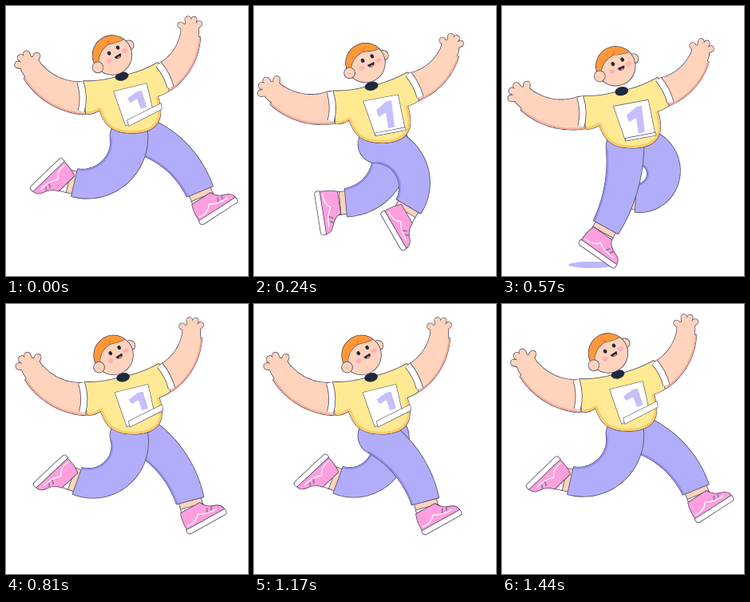
An HTML page with a canvas for the animation above (1470 ms loop, 303 by 338 pixels).

```html
<!DOCTYPE html>
<html lang="en">
<head>
<meta charset="utf-8">
<title>Runner</title>
<style>
  html, body { margin: 0; width: 100%; height: 100%; overflow: hidden; background: #fff; }
  canvas { display: block; width: 100%; height: 100%; }
</style>
</head>
<body>
<canvas id="stage" width="303" height="338"></canvas>
<script>
const ctx = document.getElementById('stage').getContext('2d');
const LOOP = 1470, STEP = 30, STRIDE = 720, HALF = STRIDE / 2;
const INK = '#4c4b64', SKIN = '#ffd3bc', SKIN_SHADE = '#f9aa98', WHITE = '#fff',
  SHIRT = '#ffe993', SHIRT_SHADE = '#ffcb68', PANTS = '#b1adfa', PANTS_SHADE = '#928df0',
  PINK = '#ff9fde', HAIR = '#ff9838', NAVY = '#20283c', LILAC = '#c6bffb', SHADOW = '#bcb6fb';

// One leg's stride; the other leg is half a stride away.
// Angles in degrees, clockwise from the right: thigh, shin, toes
const GAIT = [
  { t: 0, thigh: 86, shin: 193, toes: 136 },
  { t: 90, thigh: 78, shin: 200, toes: 137 },
  { t: 210, thigh: 0, shin: 184, toes: 100 },
  { t: 240, thigh: 5, shin: 121, toes: 60 },
  { t: 360, thigh: 20, shin: 68, toes: -33 },
  { t: 450, thigh: 32, shin: 75, toes: -29 },
  { t: 570, thigh: 88, shin: 119, toes: 35 },
  { t: 600, thigh: 78, shin: 175, toes: 81 }
];
const FINGERS = [[20, 1], [21, -8], [17, -15], [5, -19]];

const SHIRT_PATH = new Path2D('M97 94 Q118 95 138 89 L153 86 Q172 81 190 71 L204 106 Q199 110 190 113' +
  'C202 150 181 159 157 159 C130 159 122 145 117 130 Q109 136 100 135 Z');
const SHIRT_HEM = new Path2D('M190 113 C202 150 181 159 157 159 C130 159 122 145 117 130 Q109 136 100 135');
const CUFFS = [new Path2D('M93 95 Q99 115 94 132'), new Path2D('M191 73 Q202 86 206 102')];
const DIGIT = new Path2D('M-14 11 L-1 0 L5 -1 L9 32 L1 34 L-2 14 L-11 20 Z');
const SHOE = new Path2D('M-17 17 Q-18 3 -14 -7 L13 -7 Q17 2 27 5 Q37 8 36 17 Z');
const SOLE = new Path2D('M-18 15 L36 15 Q38 21 33 21 L-15 21 Q-19 21 -18 15 Z');
const TRIM = new Path2D('M-15 11 Q-2 13 4 4 Q12 10 28 10');
const HAIR_CAP = new Path2D('M-24.3 3 A24.5 24.5 0 0 1 22.8 -9 Q12 -10 4 -14 Q-8 -14 -15 -7 Q-20 -3 -20 3 Z');

const lerp = (a, b, k) => a + (b - a) * k;
const rad = degrees => degrees * Math.PI / 180;
function ramp(t, from, to) {
  const k = Math.min(1, Math.max(0, (t - from) / (to - from)));
  return k * k * (3 - 2 * k);
}

// Smooth periodic curve through the gait keys
function gait(t) {
  const n = GAIT.length;
  const at = j => ({ ...GAIT[(j + n) % n], t: GAIT[(j + n) % n].t + Math.floor(j / n) * STRIDE });
  const i = GAIT.findLastIndex(key => key.t <= t);
  const [a, b, c, d] = [i - 1, i, i + 1, i + 2].map(at);
  const span = c.t - b.t, u = (t - b.t) / span, v = 1 - u;
  const value = name => {
    const m0 = (c[name] - a[name]) / (c.t - a.t) * span;
    const m1 = (d[name] - b[name]) / (d.t - b.t) * span;
    return ramp(v, 0, 1) * b[name] + ramp(u, 0, 1) * c[name] + u * v * (v * m0 - u * m1);
  };
  return { thigh: rad(value('thigh')), shin: rad(value('shin')), toes: rad(value('toes')) };
}

function within(x, y, angle, drawPart) {
  ctx.save();
  ctx.translate(x, y);
  ctx.rotate(angle);
  drawPart();
  ctx.restore();
}

function paint(path, fill, width = 1.6) {
  ctx.strokeStyle = INK;
  ctx.lineWidth = width;
  ctx.stroke(path);
  ctx.fillStyle = fill;
  ctx.fill(path);
}

function shade(path, edge, color, width) {
  ctx.save();
  ctx.clip(path);
  ctx.strokeStyle = color;
  ctx.lineWidth = width;
  ctx.stroke(edge);
  ctx.restore();
}

function polygon(...points) {
  const path = new Path2D();
  points.forEach(p => path.lineTo(...p));
  path.closePath();
  return path;
}

function line(x0, y0, x1, y1, width) {
  ctx.lineWidth = width;
  ctx.beginPath();
  ctx.moveTo(x0, y0);
  ctx.lineTo(x1, y1);
  ctx.stroke();
}

function oval(x, y, rx, ry, color) {
  ctx.fillStyle = color;
  ctx.beginPath();
  ctx.ellipse(x, y, rx, ry, 0, 0, 7);
  ctx.fill();
}

function circle(x, y, r) {
  const path = new Path2D();
  path.arc(x, y, r, 0, 7);
  return path;
}

// Tapered tube of fixed length that bends evenly from one direction to another
function tube(x, y, from, to, length, w0, w1) {
  const path = new Path2D(), edge = new Path2D(), back = [], N = 30;
  path.arc(x, y, w0 / 2, from - Math.PI / 2, from - Math.PI * 1.5, true);
  for (let i = 0; i <= N; i++) {
    const a = lerp(from, to, i / N), r = lerp(w0, w1, i / N) / 2;
    const nx = -Math.sin(a) * r, ny = Math.cos(a) * r;
    path.lineTo(x + nx, y + ny);
    edge.lineTo(x + nx, y + ny);
    back.unshift([x - nx, y - ny]);
    if (i < N) {
      const mid = lerp(from, to, (i + .5) / N);
      x += Math.cos(mid) * length / N;
      y += Math.sin(mid) * length / N;
    }
  }
  back.forEach(p => path.lineTo(...p));
  path.closePath();
  return { path, edge, x, y };
}

function drawArm(x, y, lift, side, size) {
  const { path, edge, x: wx, y: wy } = tube(0, 0, rad(25), rad(-26), 68, 39, 27);
  ctx.save();
  ctx.translate(x, y);
  ctx.scale(side * size, size);
  ctx.rotate(-rad(lift));
  ctx.lineCap = 'round';
  for (const [color, grow] of [[INK, 1.6], [SKIN, 0]]) {
    ctx.strokeStyle = ctx.fillStyle = color;
    ctx.fill(path);
    if (grow) { ctx.lineWidth = grow; ctx.stroke(path); }
    line(wx - 2, wy, wx + 5, wy - 4, 24 + grow);
    for (const [fx, fy] of FINGERS) line(wx + 4, wy - 4, wx + fx, wy + fy, 7.5 + grow);
  }
  shade(path, edge, SKIN_SHADE, 4);
  ctx.restore();
}

function makeLeg(hipX, hipY, t) {
  const { thigh, shin, toes } = gait(t);
  const pants = tube(hipX, hipY, thigh, shin, 104, 47, 35);
  return { pants, shin, toes, x: pants.x + Math.cos(shin) * 16, y: pants.y + Math.sin(shin) * 16 };
}

function drawLeg({ pants, shin, toes, x, y }) {
  const band = (x0, x1, r, color) => paint(polygon([x0, -r], [x1, -r], [x1, r], [x0, r]), color);
  within(pants.x, pants.y, shin, () => {
    band(-4, 9, 14, SKIN);
    band(8, 18, 14, WHITE);
  });
  within(x, y, toes, () => {
    paint(SHOE, PINK);
    paint(SOLE, WHITE);
    ctx.strokeStyle = WHITE;
    ctx.lineWidth = 1.3;
    ctx.stroke(TRIM);
    ctx.strokeStyle = '#8f769f';
    for (const lace of [18, 24]) line(lace, 3, lace - 3, 8, 1.8);
  });
  paint(pants.path, PANTS);
  shade(pants.path, pants.edge, PANTS_SHADE, 4);
}

// The lower edge of the paper folds up as the wind lifts it
function drawBib(curl) {
  const left = [150, 150], right = [187 - 4 * curl, 143 - 15 * curl];
  paint(polygon([135, 107], [178 - 2 * curl, 99 - 2 * curl], right, left), WHITE, 1.2);
  ctx.save();
  ctx.translate(165, 107);
  ctx.rotate(-.12 * curl);
  ctx.scale(1, 1 - .35 * curl);
  ctx.fillStyle = LILAC;
  ctx.fill(DIGIT);
  ctx.restore();
  const fold = 3 + 4 * curl, tip = [lerp(187, 194, curl), lerp(140, 122, curl)];
  paint(polygon([150 + 2 * curl, 150 - fold], tip, [tip[0] + 1, tip[1] + fold], [150 + 4 * curl, 150]), WHITE, 1.2);
}

function drawTorso(drop) {
  drawArm(94, 115, 28 - 16 * drop, -1, 1.04);
  drawArm(198, 89, 57 - 14 * drop, 1, .93);
  paint(SHIRT_PATH, SHIRT);
  shade(SHIRT_PATH, SHIRT_HEM, SHIRT_SHADE, 6);
  ctx.lineCap = 'butt';
  for (const [color, width] of [[INK, 9], [WHITE, 7.4]]) {
    ctx.strokeStyle = color;
    ctx.lineWidth = width;
    CUFFS.forEach(cuff => ctx.stroke(cuff));
  }
  within(145, 88, -.2, () => oval(0, 0, 8.5, 5.5, NAVY));
  drawBib(1 - drop);
}

function drawHead() {
  paint(circle(24, 1, 6), SKIN);
  paint(circle(0, 0, 24.3), SKIN);
  paint(HAIR_CAP, HAIR, 1.2);
  paint(circle(-23.5, 3, 6.5), SKIN);
  ctx.strokeStyle = SKIN_SHADE;
  line(-26, 2, -23, 5, 1);
  ctx.strokeStyle = '#d9752a';
  line(3, -14, 6, -18, 1);
  for (const cheek of [-7, 16]) oval(cheek, 4, 3.5, 2.8, '#ffaebb');
  for (const eye of [-2, 11]) oval(eye, -4, 2.2, 2.6, NAVY);
  ctx.fillStyle = NAVY;
  ctx.beginPath();
  ctx.arc(5.5, 3.5, 4.6, 0, Math.PI);
  ctx.fill();
  oval(5.5, 6.8, 2.2, 1, '#f5828f');
}

function draw(time) {
  const t = Math.floor(time % LOOP / STEP) * STEP % STRIDE, beat = t % HALF;
  // drop lowers the arms and chest, sink is the give of the standing leg
  const drop = ramp(beat, 80, 190) * (1 - ramp(beat, 235, 360));
  const sink = ramp(beat, 0, 180) * (1 - ramp(beat, 205, 245));
  const hipY = 163 + 10 * drop + 4 * sink;
  const near = makeLeg(154, hipY, t), far = makeLeg(170, hipY - 1, (t + HALF) % STRIDE);

  ctx.fillStyle = WHITE;
  ctx.fillRect(0, 0, 303, 338);
  ctx.lineJoin = 'round';
  ctx.lineCap = 'butt';
  if (beat >= 120 && beat <= 225) {
    const size = ramp(beat, 60, 160);
    oval((t < HALF ? far : near).x - 10, 324, 29 * size, 4 * size, SHADOW);
  }
  drawLeg(far);
  drawLeg(near);
  within(2 * drop + 3 * sink, 12 * drop + 7 * sink, 0, () => drawTorso(drop));
  within(133 + 6.5 * drop + 3 * sink, 61.5 + 9.5 * drop + 4.5 * sink, rad(-33 + 8 * drop), drawHead);
}

function tick() {
  draw(performance.now());
  requestAnimationFrame(tick);
}
tick();
</script>
</body>
</html>
```
